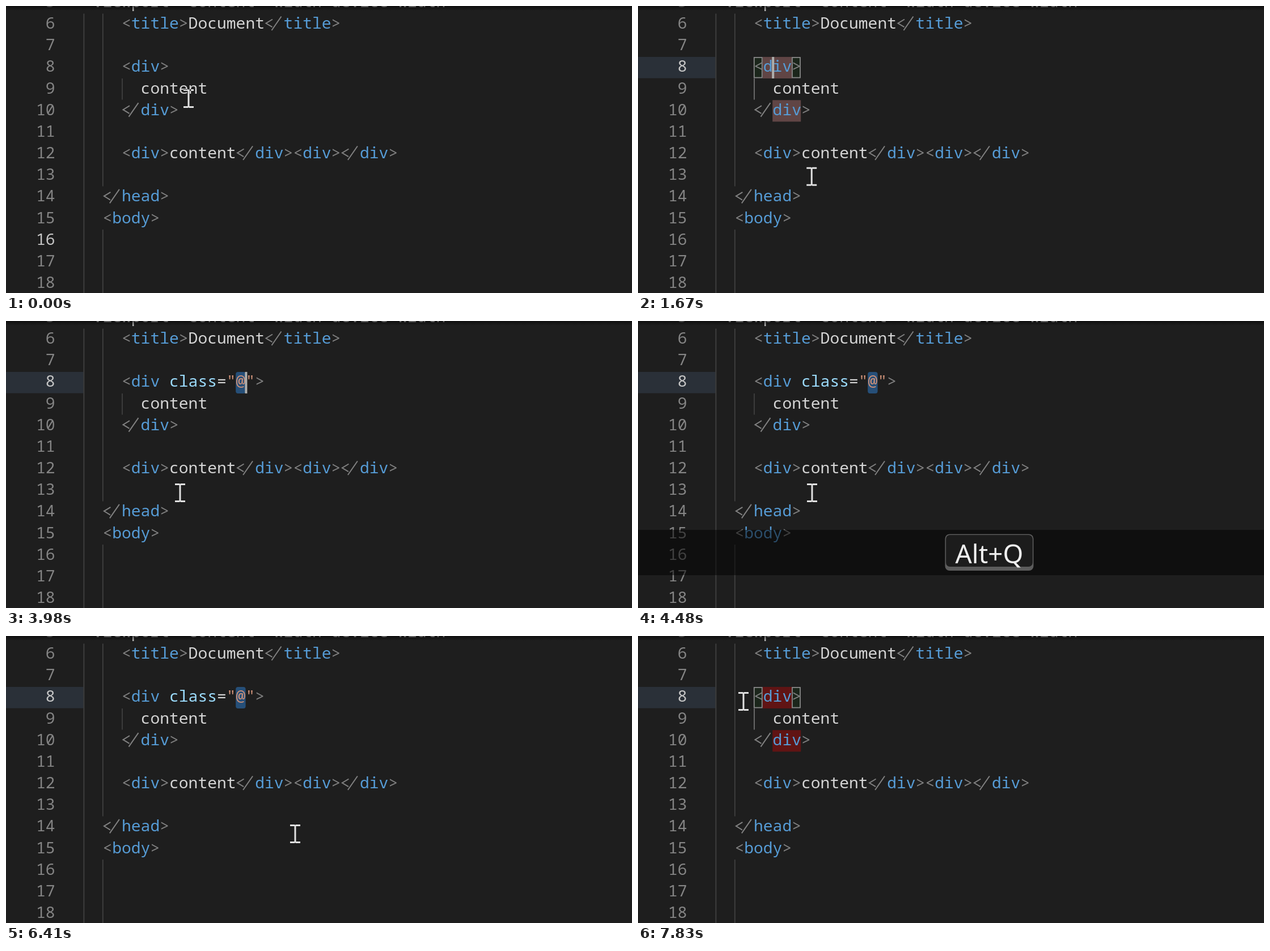
Recreate the animation shown at these times as an HTML page. Size 1104 by 507 pixels, loop 8 s.

```html
<!DOCTYPE html>
<html lang="en">
<head>
<meta charset="utf-8">
<title>Editor</title>
<style>
  html, body { margin: 0; width: 100%; height: 100%; overflow: hidden; background: #1e1e1e; }
  svg { display: block; width: 100%; height: 100%; }
  .mono { font: 28px "Noto Sans Mono", "DejaVu Sans Mono", monospace; font-variant-ligatures: none; }
  .key { font: 46px "Noto Sans", "Open Sans", sans-serif; }
  #pointer { mix-blend-mode: difference; }
</style>
</head>
<body>
<svg id="stage" viewBox="0 0 1104 507"></svg>
<script>
const LOOP = 8000, STEP = 100, BLINK = 500;
const CLICK = 1350, INSERT = 3970, CTRL = 6400, UNDO = 7000;
const CHAR = 16.8, LEFT = 204, PITCH = 38.17;
const GREY = '#808080', BLUE = '#569cd6', TEXT = '#d4d4d4', STRING = '#ce9178';
const DIM = '#858585', BRIGHT = '#c6c6c6', RED = '#601414', BROWN = '#604545';
const stage = document.getElementById('stage');

const colX = col => LEFT + col * CHAR;
const baseY = line => 40 + (line - 6) * PITCH;
const rowY = line => baseY(line) - 26.4;

function add(parent, tag, attrs, text) {
  const el = document.createElementNS('http://www.w3.org/2000/svg', tag);
  for (const name in attrs) el.setAttribute(name, attrs[name]);
  if (text) el.textContent = text;
  return parent.appendChild(el);
}
const group = parent => add(parent, 'g');
const rect = (parent, x, y, width, height, fill, more) =>
  add(parent, 'rect', { x, y, width, height, fill, ...more });
const word = (parent, line, col, text, fill) =>
  add(parent, 'text', { x: colX(col), y: baseY(line), fill, class: 'mono' }, text);
const guide = (x, top, bottom) =>
  add(stage, 'path', { d: `M${x} ${top}V${bottom}`, stroke: '#404040', 'stroke-width': 1.8 });

// The closing bracket pair is one joined sign, two cells wide.
function closer(parent, line, col) {
  add(parent, 'path', {
    d: 'M14 -16.5L2.5 -9.5L13.5 -2.8M29.5 -21.5L12.5 3',
    transform: `translate(${colX(col)} ${baseY(line)})`,
    fill: 'none', stroke: GREY, 'stroke-width': 2
  });
}

function markup(parent, line, col, source) {
  let inTag = false;
  for (const part of source.match(/<\/|[<>]|[^<>]+/g)) {
    if (part === '</') closer(parent, line, col);
    else word(parent, line, col, part, '<>'.includes(part) ? GREY : inTag ? BLUE : TEXT);
    if (part[0] === '<') inTag = true;
    if (part === '>') inTag = false;
    col += part.length;
  }
}

// Backgrounds
rect(stage, 0, 0, 1104, 507, '#1e1e1e');
const gutter = rect(stage, 0, rowY(8), 136.5, 37.6, '#2a3038');
guide(137.4, 13.5, 507);
guide(170.8, 13.5, 318.5);
guide(170.8, 395, 507);
const innerGuide = guide(205, 128, 165.5);

const marks = group(stage);
rect(marks, colX(1) - 0.8, rowY(8), 51.6, 38);
rect(marks, colX(2) - 0.4, rowY(10), 50, 38);

const brackets = group(stage);
for (const col of [0, 4]) {
  rect(brackets, colX(col) + 0.8, rowY(8) + 1, 14, 35.6, '#1b261b',
    { stroke: '#888', 'stroke-width': 1.8 });
}

// Line numbers
const numbers = {};
for (let n = 5; n <= 18; n++) {
  numbers[n] = add(stage, 'text', {
    x: 86.6, y: baseY(n), 'text-anchor': 'end', fill: DIM, class: 'mono'
  }, String(n));
}

// Code
word(stage, 5, -3, 'viewport" content="width=device-width', '#b8b8b8');
markup(stage, 6, 0, '<title>Document</title>');
markup(stage, 9, 2, 'content');
markup(stage, 10, 0, '</div>');
markup(stage, 12, 0, '<div>content</div><div></div>');
markup(stage, 14, -2, '</head>');
markup(stage, 15, -2, '<body>');

const plain = group(stage);
markup(plain, 8, 0, '<div>');

const withClass = group(stage);
rect(withClass, colX(12) - 0.4, rowY(8), 17.4, 38, '#264f78', { rx: 4 });
markup(withClass, 8, 0, '<div');
word(withClass, 8, 5, 'class', '#9cdcfe');
word(withClass, 8, 10, '=', TEXT);
word(withClass, 8, 11, '"@"', STRING);
word(withClass, 8, 14, '>', GREY);

const caret = rect(stage, 0, rowY(8), 4, 38, '#aeafad');

// Scroll shadow
const fade = add(add(stage, 'defs'), 'linearGradient', { id: 'fade', x2: 0, y2: 1 });
add(fade, 'stop', { offset: 0, 'stop-color': '#000', 'stop-opacity': 0.5 });
add(fade, 'stop', { offset: 1, 'stop-color': '#000', 'stop-opacity': 0 });
rect(stage, 0, 0, 1104, 8, 'url(#fade)');

// Key display
const overlay = group(stage);
rect(overlay, 0, 369, 1104, 80, '#000', { 'fill-opacity': 0.5 });
function keyCap(label, width) {
  const cap = group(overlay), x = 619.5 - width / 2;
  rect(cap, x, 376.5, width, 64.5, '#5c5c5c', { rx: 8 });
  rect(cap, x + 1.6, 378, width - 3.2, 56, '#1c1c1c', { rx: 7 });
  add(cap, 'text', { x: 619.5, y: 428, 'text-anchor': 'middle', fill: '#f0f0f0', class: 'key' }, label);
  return cap;
}
const altQ = keyCap('Alt+Q', 156);
const ctrlZ = keyCap('Ctrl+Z', 162);

const pointer = add(stage, 'path', {
  id: 'pointer', fill: '#fff',
  d: 'M-9 -16H-1L0 -15L1 -16H9V-13H1.5V14H9V17H1L0 16L-1 17H-9V14H-1.5V-13H-9Z'
});

// Pointer strokes, each gliding on from where the last one ended
const home = { x: 322, y: 163 };
const moves = [
  { start: 0, time: 350, x: 229, y: 96 },
  { start: 450, time: 300, x: 240, y: 100 },
  { start: 1360, time: 320, x: 307, y: 303 },
  { start: 5490, time: 400, x: 510, y: 349 },
  { start: 6410, time: 400, x: 463, y: 325 },
  { start: 7310, time: 500, x: 186, y: 115 }
];
const ease = p => p * p * (3 - 2 * p);

// The screen was sampled ten times a second, so moves advance in steps.
function pointerAt(t) {
  let { x, y } = home;
  for (const m of moves) {
    const steps = Math.max(0, Math.floor((t - m.start) / STEP));
    const k = ease(Math.min(1, steps * STEP / m.time));
    x += (m.x - x) * k;
    y += (m.y - y) * k;
  }
  return [x, y];
}

// Blinking restarts with every edit and pauses while Ctrl is held.
function caretOn(t) {
  if (t < CLICK || (t >= CTRL && t < UNDO)) return false;
  const since = t - (t >= UNDO ? UNDO : t >= INSERT ? INSERT : CLICK);
  return Math.floor(since / BLINK) % 2 === 0;
}

// Fades in over two steps, then cuts out.
function keyOpacity(since) {
  if (since < 0 || since >= 7 * STEP) return 0;
  return Math.min(1, Math.floor(since / STEP) / 2) ** 1.25;
}

function markFill(t) {
  if (t >= UNDO + 2 * STEP) return RED;
  if (t < CLICK + STEP || t >= INSERT) return 'none';
  return t < CLICK + 2 * STEP ? RED : BROWN;
}

const show = (el, on) => el.setAttribute('visibility', on ? 'inherit' : 'hidden');

function draw(t) {
  const clicked = t >= CLICK;
  const undone = t >= UNDO;
  const hasClass = t >= INSERT && !undone;
  const onTag = clicked && !hasClass;

  show(gutter, clicked);
  numbers[8].setAttribute('fill', clicked ? BRIGHT : DIM);
  numbers[16].setAttribute('fill', clicked ? DIM : BRIGHT);
  innerGuide.setAttribute('stroke', onTag ? '#707070' : '#404040');
  show(brackets, onTag);
  show(plain, !hasClass);
  show(withClass, hasClass);
  marks.setAttribute('fill', markFill(t));
  for (const mark of marks.children) mark.removeAttribute('fill');

  show(caret, caretOn(t));
  caret.setAttribute('x', hasClass ? colX(13) - 1 : colX(2) - 1.4);

  overlay.setAttribute('opacity', keyOpacity(t - (undone ? UNDO : INSERT)));
  show(altQ, !undone);
  show(ctrlZ, undone);

  pointer.setAttribute('transform', `translate(${pointerAt(t)})`);
}

const start = performance.now();
function tick() {
  draw((performance.now() - start) % LOOP);
  requestAnimationFrame(tick);
}
draw(0);
requestAnimationFrame(tick);
</script>
</body>
</html>
```
